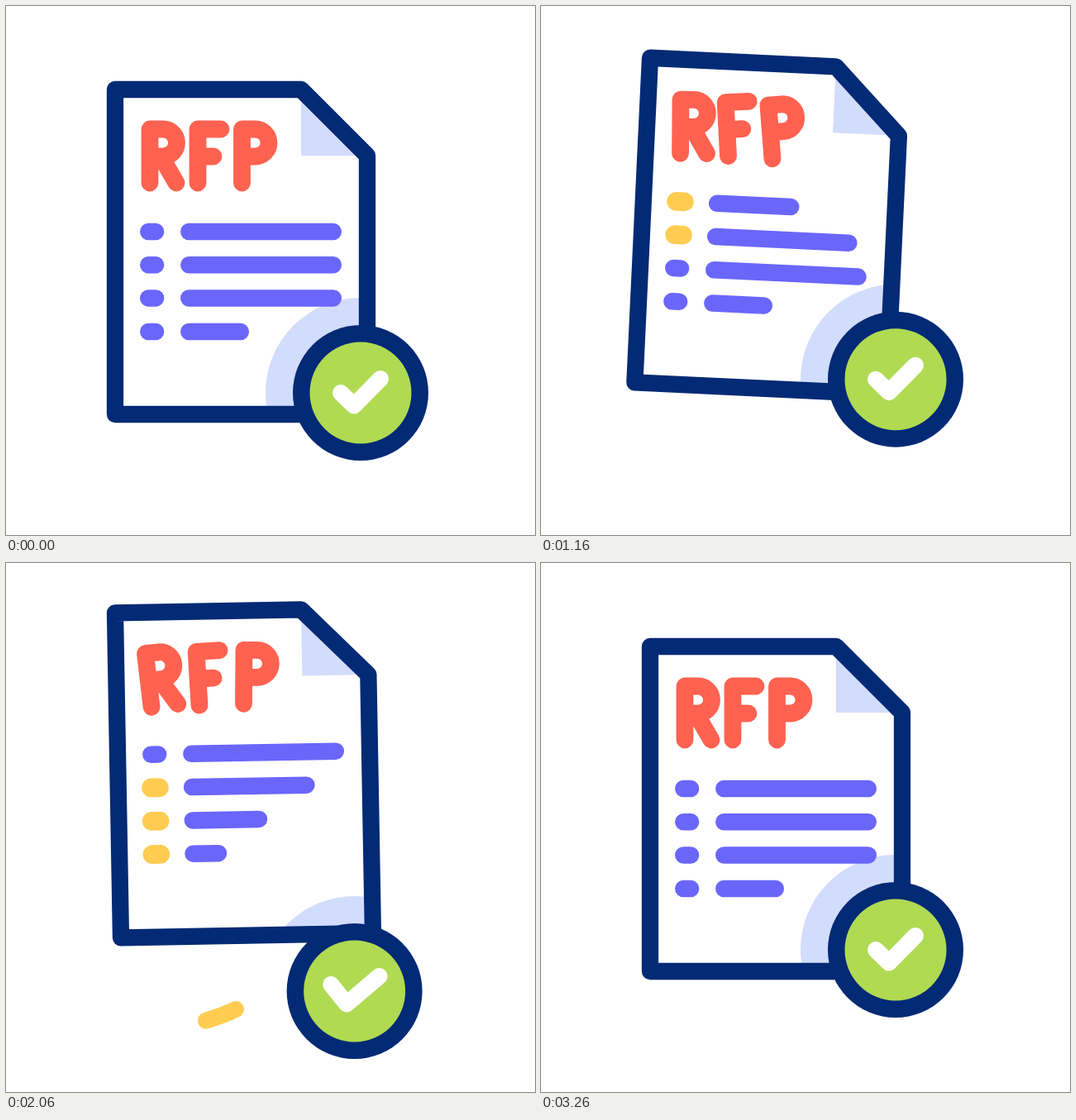
These frames come from a looping animation (640x640 px, 3600 ms). An HTML page with a canvas:

```html
<!DOCTYPE html>
<html lang="en">
<head>
<meta charset="utf-8">
<title>RFP approved</title>
<style>
html, body { margin: 0; width: 100%; height: 100%; overflow: hidden; background: #fff; }
canvas { display: block; width: 640px; height: 640px; }
</style>
</head>
<body>
<canvas id="stage" width="640" height="640" role="img" aria-label="RFP document with a check mark"></canvas>
<script>
const LOOP = 3600, TAU = 2 * Math.PI;
const NAVY = '#032a75', PURPLE = '#6a66fa', CORAL = '#ff6250';
const PALE = '#d2dcfc', GREEN = '#b0da52', YELLOW = '#ffcc52';
const ctx = document.getElementById('stage').getContext('2d');

// Eased 0 to 1 between two times.
function ease(t, from, to) {
  const u = Math.min(1, Math.max(0, (t - from) / (to - from)));
  return u * u * (3 - 2 * u);
}

// Eased moves from one turning point [time, value] to the next.
function glide(t, first, ...rest) {
  let [from, value] = first;
  for (const [to, next] of rest) {
    value += (next - value) * ease(t, from, to);
    if (t < to) break;
    from = to;
  }
  return value;
}

// Cosine that swings from -1 at time `low`, with a period in ms.
const wave = (t, low, period) => -Math.cos(TAU * (t - low) / period);

const docY = t => glide(t, [280, 101], [1020, 53], [1540, 107], [2160, 57], [2860, 101]);
const docTurn = t => glide(t, [640, 0], [1320, 3.15], [1780, -1.4], [1980, -1.4], [2430, 3.05], [3000, 0]);
const badgeY = t => glide(t, [280, 468], [980, 430], [1540, 518], [2440, 518], [2980, 468]);
const badgeSway = t =>
  7.4 * wave(t, 1470, 600) * ease(t, 1360, 1460) * (1 - ease(t, 2440, 2900));

const letterTurn = t =>
  (6.4 * wave(t, 880, 1330) - 0.8) * ease(t, 280, 520) * (1 - ease(t, 2440, 2980));

const LETTER_LAG = 130;
const letters = [
  { x: 190, path: new Path2D('M174 214V149H190A16.5 16.5 0 0 1 190 182H174M188 183L206 214') },
  { x: 245, path: new Path2D('M232 214V149H260M232 182H251') },
  { x: 301, path: new Path2D('M285.5 214V149H301.5A16.5 16.5 0 0 1 301.5 182H285.5') }
];

// Each bar shortens by `dip` and grows back during its span.
const rows = [
  { full: 195, on: 560, span: 1140, dip: 0.44 },
  { full: 195, on: 980, span: 1400, dip: 0.43 },
  { full: 195, on: 1310, span: 1345, dip: 0.5 },
  { full: 83, on: 1700, span: 1040, dip: 0.49 }
];

const page = new Path2D('M132 101H357L437 181V494H132Z');
const fold = new Path2D('M357 101V181H437Z');

function swoosh(d, headStart, tailStart, end) {
  const el = document.createElementNS('http://www.w3.org/2000/svg', 'path');
  el.setAttribute('d', d);
  return { path: new Path2D(d), size: el.getTotalLength(), headStart, tailStart, end };
}
const swooshes = [
  swoosh('M43 413C37 476 82 538 153.5 557.5C190 567 238 559 278 540', 1400, 1700, 2160),
  swoosh('M478 122C528 146 565 206 565 278', 2760, 2860, 3220)
];

const rad = deg => deg * Math.PI / 180;

function disc(x, y, r, color) {
  ctx.fillStyle = color;
  ctx.beginPath();
  ctx.arc(x, y, r, 0, TAU);
  ctx.fill();
}

function line(color, width, ...pts) {
  ctx.strokeStyle = color;
  ctx.lineWidth = width;
  ctx.beginPath();
  pts.forEach(([x, y]) => ctx.lineTo(x, y));
  ctx.stroke();
}

function drawSwoosh(s, t) {
  const head = ease(t, s.headStart, s.headStart + 280);
  const tail = ease(t, s.tailStart, s.end);
  if (head - tail < 0.005) return;
  ctx.save();
  ctx.strokeStyle = YELLOW;
  ctx.lineWidth = 20;
  ctx.setLineDash([(head - tail) * s.size, 2 * s.size]);
  ctx.lineDashOffset = -tail * s.size;
  ctx.stroke(s.path);
  ctx.restore();
}

function drawRow(row, i, t) {
  const y = 273 + 40.3 * i;
  const u = (t - row.on) / row.span;
  const lit = u > 0 && u < 1;
  const bell = lit ? Math.sin(Math.PI * u) ** 2 : 0;
  const grow = 1 + 0.11 * Math.min(1, 12 * bell);
  line(lit ? YELLOW : PURPLE, 20.5 * grow, [176.7 - 4.4 * grow, y], [176.7 + 4.4 * grow, y]);
  line(PURPLE, 20.5, [221.3, y], [200.8 + row.full * (1 - row.dip * bell), y]);
}

function drawLetter(letter, i, t) {
  ctx.save();
  ctx.translate(letter.x, 214);
  ctx.rotate(rad(letterTurn(t - i * LETTER_LAG)));
  ctx.translate(-letter.x, -214);
  ctx.strokeStyle = CORAL;
  ctx.lineWidth = 20.8;
  ctx.stroke(letter.path);
  ctx.restore();
}

function drawPage(t, bx, by) {
  ctx.save();
  ctx.translate(132, docY(t));
  ctx.rotate(rad(docTurn(t)));
  ctx.translate(-132, -101);
  ctx.fillStyle = '#fff';
  ctx.fill(page);
  ctx.fillStyle = PALE;
  ctx.fill(fold);

  // The badge halo shows only on the paper.
  ctx.save();
  ctx.clip(page);
  ctx.resetTransform();
  disc(bx, by, 115, PALE);
  ctx.restore();

  rows.forEach((row, i) => drawRow(row, i, t));
  letters.forEach((letter, i) => drawLetter(letter, i, t));
  ctx.strokeStyle = NAVY;
  ctx.lineWidth = 20.3;
  ctx.stroke(page);
  ctx.restore();
}

// The check folds up as the badge sways right and opens as it sways left.
function drawBadge(x, y, sway) {
  disc(x, y, 82, NAVY);
  disc(x, y, 61.5, GREEN);
  line('#fff', 20,
    [x - 24 + 0.6 * sway, y + 1.1 * sway],
    [x - 8 + 0.2 * sway, y + 15.5],
    [x + Math.min(30, 24 - 1.6 * sway), y - 17 + 1.1 * Math.max(-1, sway)]);
}

function draw(t) {
  ctx.fillStyle = '#fff';
  ctx.fillRect(0, 0, 640, 640);
  ctx.lineCap = ctx.lineJoin = 'round';
  const sway = badgeSway(t), bx = 429 + sway, by = badgeY(t);
  swooshes.forEach(s => drawSwoosh(s, t));
  drawPage(t, bx, by);
  drawBadge(bx, by, sway);
}

const start = performance.now();
function tick() {
  draw((performance.now() - start) % LOOP);
  requestAnimationFrame(tick);
}
tick();
</script>
</body>
</html>
```
